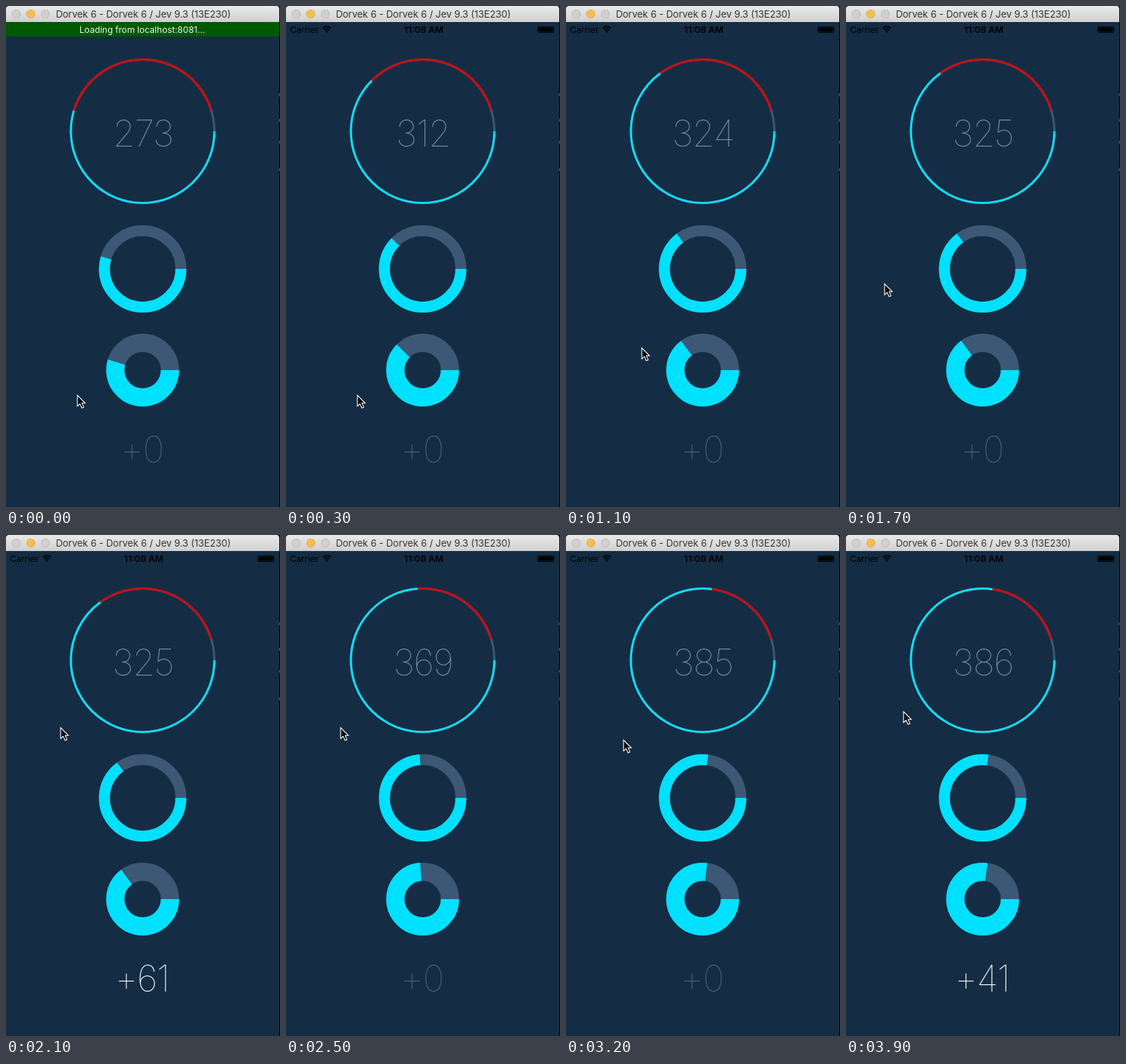
Animation, 376 px wide and 688 px high, one loop 4000 ms. Source, as an HTML page:

```html
<!DOCTYPE html>
<html>
<head>
<meta charset="utf-8">
<style>
html, body { margin: 0; width: 100%; height: 100%; overflow: hidden; background: #000; }
svg { display: block; font-family: Inter, sans-serif; }
.ring { fill: none; }
.track { stroke: #3d5875; }
.fill { stroke: #00e0ff; }
.limit { stroke: #c80e12; }
.big { font-size: 50px; font-weight: 100; letter-spacing: -1.3px; text-anchor: middle; }
</style>
</head>
<body>
<svg width="376" height="688" viewBox="0 0 376 688">
  <defs>
    <linearGradient id="chrome" x2="0" y2="1">
      <stop stop-color="#e9e9e9"/><stop offset="1" stop-color="#d0d0d0"/>
    </linearGradient>
  </defs>
  <path d="M375 122h1M375 157h1M375 187h1M375 225h1" stroke="#555" stroke-width="4"/>
  <path d="M0 22V4q0-4 4-4h367q4 0 4 4v18z" fill="url(#chrome)"/>
  <g stroke-width=".8">
    <circle cx="14" cy="11" r="5.7" fill="#d0d0d0" stroke="#b8b8b8"/>
    <circle cx="34" cy="11" r="5.7" fill="#f6be4f" stroke="#dfa43a"/>
    <circle cx="54" cy="11" r="5.7" fill="#d0d0d0" stroke="#b8b8b8"/>
  </g>
  <text x="188.5" y="16" font-size="13" text-anchor="middle" fill="#333">Dorvek 6 - Dorvek 6 / Jev 9.3 (13E230)</text>
  <path d="M0 22h375v666H0z" fill="#152d44"/>

  <g id="status">
    <text x="5.5" y="36.5" font-size="12">Carrier</text>
    <path d="M50.5 30.5q5.5-4.6 11 0M52.5 32.8q3.5-3 7 0" fill="none" stroke="#000" stroke-width="1.7"/>
    <path d="M53.8 34.5q2.2-1.8 4.4 0L56 37z"/>
    <text x="189" y="36.5" font-size="12.4" font-weight="600" text-anchor="middle">11:08 AM</text>
    <rect x="345.5" y="28.5" width="22" height="8" rx="1.5" fill="none" stroke="#000" stroke-width=".8"/>
    <rect x="346.5" y="29.5" width="20" height="6" rx=".8"/>
    <path d="M368.5 31q1.5 1.5 0 3z"/>
  </g>
  <g id="loading">
    <path d="M0 22h375v20H0z" fill="#005800"/>
    <text x="187" y="36.5" font-size="12.1" text-anchor="middle" fill="#eef4ee">Loading from localhost:8081...</text>
  </g>

  <g id="rings"></g>
  <text id="points" class="big" x="188" y="192.5" fill="#7591af"></text>
  <text id="delta" class="big" x="186.5" y="627" fill="#4c6479"></text>
  <path id="cursor" d="M0 .5V15.5L3.5 12.3L6.1 18L8.7 16.9L6.2 11.3H10.5z" stroke="#fff" stroke-width="1.1"/>
</svg>
<script>
const LOOP = 4000, STEP = 100, MAX_POINTS = 500;
const $ = id => document.getElementById(id);

// [centre y, outer radius, stroke width, limit points]
const rings = [[172, 100, 3, 476], [361, 60, 15, 0], [500, 50, 25, 0]];
const arc = (kind, [cy, r, width], points) =>
  `<circle class="ring ${kind}" cx="187.5" cy="${cy}" r="${r - width / 2}" stroke-width="${width}"
    pathLength="${MAX_POINTS}" stroke-dasharray="${points} ${MAX_POINTS}"/>`;
$('rings').innerHTML = rings.map(ring =>
  arc('track', ring, MAX_POINTS) + (ring[3] ? arc('limit', ring, ring[3]) : '') + arc('fill', ring, 0)
).join('');
const fills = document.querySelectorAll('.fill');

// Pointer path: [ms, x, y]
const path = [
  [0, 98, 534], [700, 98, 534], [1100, 104, 469], [1700, 53, 381], [1800, 58, 322], [2100, 75, 264],
  [2500, 75, 264], [3200, 79, 281], [3600, 79, 283], [3900, 79, 242]
];
const drags = [{ from: 1750, to: 2174, y: 325 }, { from: 3650, to: LOOP, y: 283 }];

function pointer(t) {
  const i = Math.max(1, path.findIndex(p => p[0] >= t));
  const [a, b] = [path[i - 1], path[i]];
  const k = (t - a[0]) / (b[0] - a[0]);
  return [1, 2].map(n => a[n] + (b[n] - a[n]) * k);
}

// Overdamped spring: share of the way still to go after s seconds
const SLOW = 4.65, FAST = 24;
const remaining = s => (FAST * Math.exp(-SLOW * s) - SLOW * Math.exp(-FAST * s)) / (FAST - SLOW);

function pointsAt(t) {
  const release = drags[0].to;
  return t < release
    ? 325 - 51.6 * Math.exp(-SLOW * t / 1000)
    : 386 - 61 * remaining((t - release) / 1000);
}

function draw(now) {
  const t = Math.floor(now % LOOP / STEP) * STEP;
  const points = pointsAt(t), [x, y] = pointer(t);
  const drag = drags.find(d => t >= d.from && t < d.to);
  fills.forEach(f => f.setAttribute('stroke-dasharray', `${points} ${MAX_POINTS}`));
  $('points').textContent = Math.floor(points + 0.1);
  $('delta').textContent = '+' + (drag ? Math.round(drag.y - y) : 0);
  $('delta').setAttribute('fill', drag ? '#fff' : '#4c6479');
  $('cursor').setAttribute('transform', `translate(${x} ${y})`);
  $('loading').style.display = t < 200 ? '' : 'none';
  $('status').style.display = t < 200 ? 'none' : '';
}

const start = performance.now();
(function tick() {
  draw(performance.now() - start);
  requestAnimationFrame(tick);
})();
</script>
</body>
</html>
```
